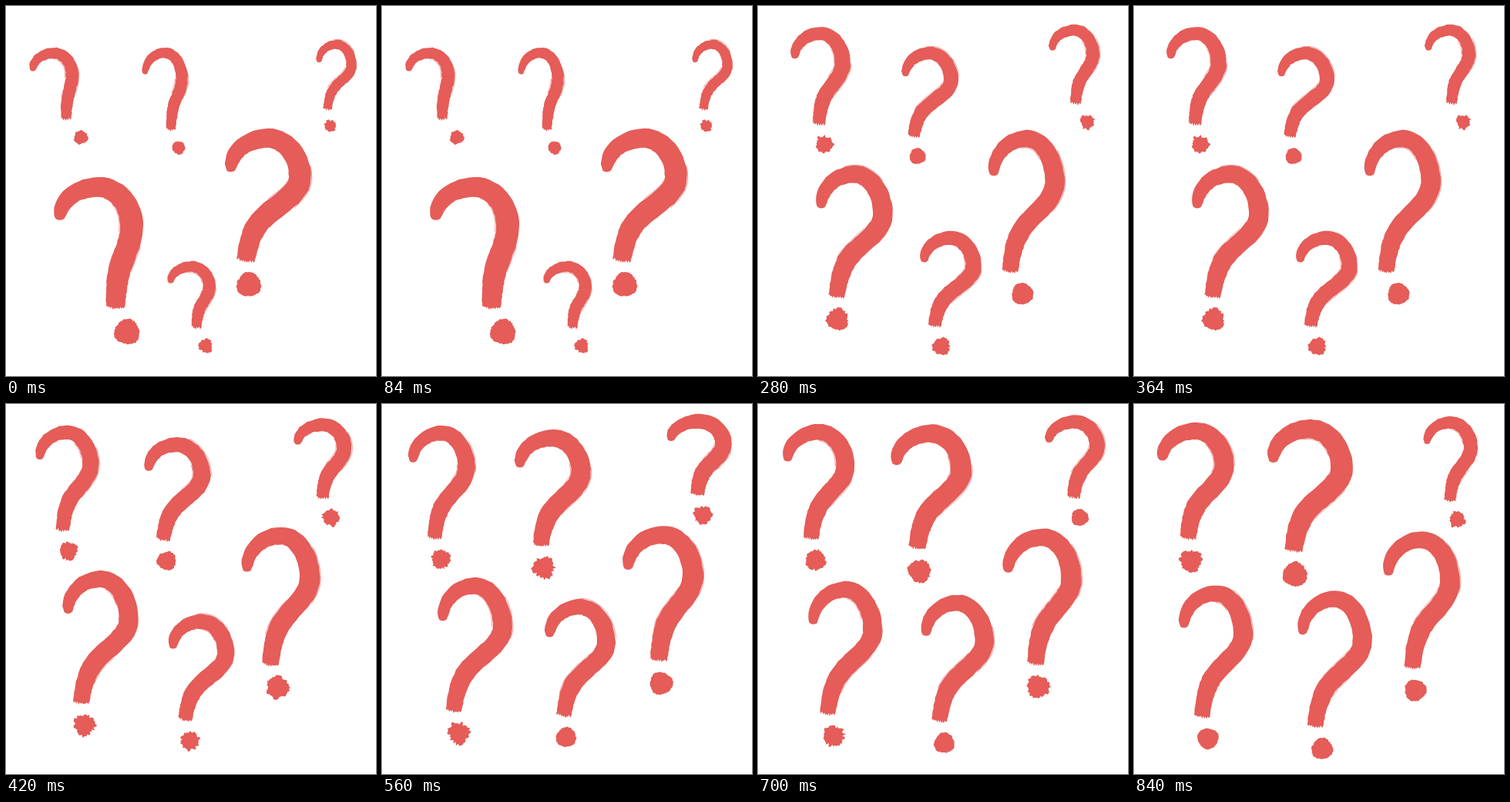
These frames come from a looping animation (480 by 480 pixels, 0.98 s). An HTML page:

```html
<!DOCTYPE html>
<html lang="en">
<head>
<meta charset="utf-8">
<title>Question marks</title>
<style>
  html, body { margin: 0; width: 100%; height: 100%; overflow: hidden; background: #fff; }
  svg { display: block; width: 100%; height: 100%; }
  #ink { fill: #e55c58; }
  #hairs { fill: none; stroke: #e55c58; stroke-width: .6; }
</style>
</head>
<body>
<svg viewBox="0 0 480 480"><path id="ink"/><path id="hairs"/></svg>
<script>
const STEP = 140, STEPS = 7;
const BEATS = [0, 1, 2, 4, 6];

// Key poses, one per beat: left, top, right, bottom of the stroke, foot x, dot x.
const marks = {
  topLeft: [
    [30,54,94,147, 78,97], [35,30,104,139, 93,110], [42,27,120,154, 79,86],
    [34,28,121,175, 68,76], [30,24,130,175, 70,74]],
  topMiddle: [
    [176,54,236,161, 214,224], [187,57,259,164, 210,223], [186,53,260,170, 202,207],
    [172,33,271,184, 206,210], [173,20,284,191, 207,209]],
  topRight: [
    [402,44,455,134, 417,421], [383,17,449,117, 410,417], [377,24,443,127, 412,427],
    [369,13,454,118, 409,416], [375,16,446,126, 410,419]],
  lowLeft: [
    [62,222,178,392, 142,157], [68,206,190,371, 135,146], [75,207,175,378, 102,103],
    [72,225,169,399, 93,100], [58,235,154,406, 88,96]],
  lowMiddle: [
    [209,331,272,418, 247,259], [207,298,277,408, 236,242], [210,292,290,416, 229,238],
    [211,253,303,405, 236,239], [212,242,309,419, 235,244]],
  lowRight: [
    [284,159,396,331, 311,315], [278,156,399,335, 341,357], [299,161,398,345, 327,343],
    [312,158,417,333, 359,362], [323,165,423,343, 361,365]]
};

const mix = (a, b, t) => a + (b - a) * t;
const mixPoint = (a, b, t) => a.map((v, i) => mix(v, b[i], t));
const distance = (a, b) => Math.hypot(b[0] - a[0], b[1] - a[1]);
const toPath = (pts, close) =>
  'M' + pts.map(p => p.map(v => v.toFixed(2)).join(' ')).join('L') + (close ? 'Z' : '');

function seeded(seed) {
  return () => {
    seed = (seed * 1664525 + 1013904223) >>> 0;
    return seed / 4294967296;
  };
}

function poseAt(keys, step) {
  const next = BEATS.findIndex(b => b >= step);
  if (BEATS[next] === step) return keys[next];
  const from = BEATS[next - 1];
  return mixPoint(keys[next - 1], keys[next], (step - from) / (BEATS[next] - from));
}

function bezier([a, b, c, d], t) {
  const u = 1 - t;
  return [0, 1].map(i =>
    u*u*u*a[i] + 3*u*u*t*b[i] + 3*u*t*t*c[i] + t*t*t*d[i]);
}

// Centre line with widths: two quarter ovals, then a slanting tail.
function spine([l, t, r, b, footX]) {
  const K = .55, w = r - l, h = b - t;
  const thin = w * .12, thick = w * .26, crown = thick * .86, foot = w * .21;
  const tip = [l + thin / 2 + 1, t + h * .3];
  const top = [mix(l, r, .5), t + crown / 2];
  const right = [r - thick / 2, t + h * .37];
  const end = [footX, b - 1.5];
  const low = [mix(footX, right[0], .21), t + h * .73];

  const span = distance(right, end);
  const along = (p, d) => p.map((v, i) => v + (end[i] - right[i]) / span * d);
  const curves = [
    [tip, [tip[0], mix(tip[1], top[1], K)], [mix(top[0], tip[0], K), top[1]], top],
    [top, [mix(top[0], right[0], K), top[1]], [right[0], mix(right[1], top[1], K)], right],
    [right, [right[0], mix(right[1], low[1], .4)], along(low, -distance(right, low) * .33), low],
    [low, along(low, distance(low, end) * .33), [mix(end[0], low[0], .2), mix(end[1], low[1], .4)], end]
  ];
  const widths = [thin, crown, thick, thick * .97, foot];

  const N = 14, line = [];
  curves.forEach((curve, k) => {
    for (let i = k ? 1 : 0; i <= N; i++) {
      const u = i / N;
      line.push([...bezier(curve, u), mix(widths[k], widths[k + 1], k ? u : Math.sqrt(u))]);
    }
  });
  return line;
}

function stroke(pose, rnd) {
  const line = spine(pose), last = line.length - 1;
  const side = (sign, extra, rough) => line.map(([x, y, w], i) => {
    const a = line[Math.max(i - 1, 0)], b = line[Math.min(i + 1, last)];
    const n = distance(a, b);
    const off = sign * (w / 2 + extra + (rnd() - .5) * rough);
    return [x + (b[1] - a[1]) / n * off, y - (b[0] - a[0]) / n * off];
  });
  const outer = side(1, 0, .9), inner = side(-1, 0, .9);

  // Rounded start and bristly finish.
  const cap = [], fringe = [];
  const [x, y, thin] = line[0];
  for (let a = .5; a < 3; a += .5)
    cap.push([x + Math.cos(a) * thin / 2, y + Math.sin(a) * thin * .35]);
  const teeth = Math.round(line[last][2] * .7);
  for (let i = 1; i < teeth; i++) {
    const t = i / teeth, p = mixPoint(outer[last], inner[last], t);
    fringe.push([p[0], p[1] + Math.sin(t * Math.PI) * 2 + (i % 2 ? .8 : -1.6) + (rnd() - .5) * 2]);
  }

  const hairs = [1, -1].map(sign => {
    const from = 12 + Math.floor(rnd() * 26);
    return toPath(side(sign, .8, .5).slice(from, from + 8 + Math.floor(rnd() * 8)));
  }).join('');
  return { body: toPath([...outer, ...fringe, ...inner.reverse(), ...cap], true), hairs };
}

function dot([l, , r, b, , x], rnd) {
  const size = (r - l) * .145, y = b + size + 14;
  const n = Math.round(size * 2.6) + 8, phase = rnd() * 6.28, rough = .08 + rnd() * .3;
  const pts = Array.from({ length: n }, (_, i) => {
    const a = i / n * Math.PI * 2;
    const q = size * (.97 + .05 * Math.sin(a * 3 + phase) + (rnd() - .5) * rough);
    return [x + Math.cos(a) * q, y + Math.sin(a) * q];
  });
  return toPath(pts, true);
}

const drawings = Array.from({ length: STEPS }, (_, step) => {
  const drawing = { ink: '', hairs: '' };
  Object.values(marks).forEach((keys, m) => {
    const rnd = seeded(977 * (step + 1) + 7919 * (m + 1));
    const pose = poseAt(keys, step), s = stroke(pose, rnd);
    drawing.ink += s.body + dot(pose, rnd);
    drawing.hairs += s.hairs;
  });
  return drawing;
});

const ink = document.getElementById('ink'), hairs = document.getElementById('hairs');
const start = performance.now();
let shown = -1;

function draw() {
  const step = Math.floor((performance.now() - start) / STEP) % STEPS;
  if (step !== shown) {
    shown = step;
    ink.setAttribute('d', drawings[step].ink);
    hairs.setAttribute('d', drawings[step].hairs);
  }
  requestAnimationFrame(draw);
}
draw();
</script>
</body>
</html>
```
